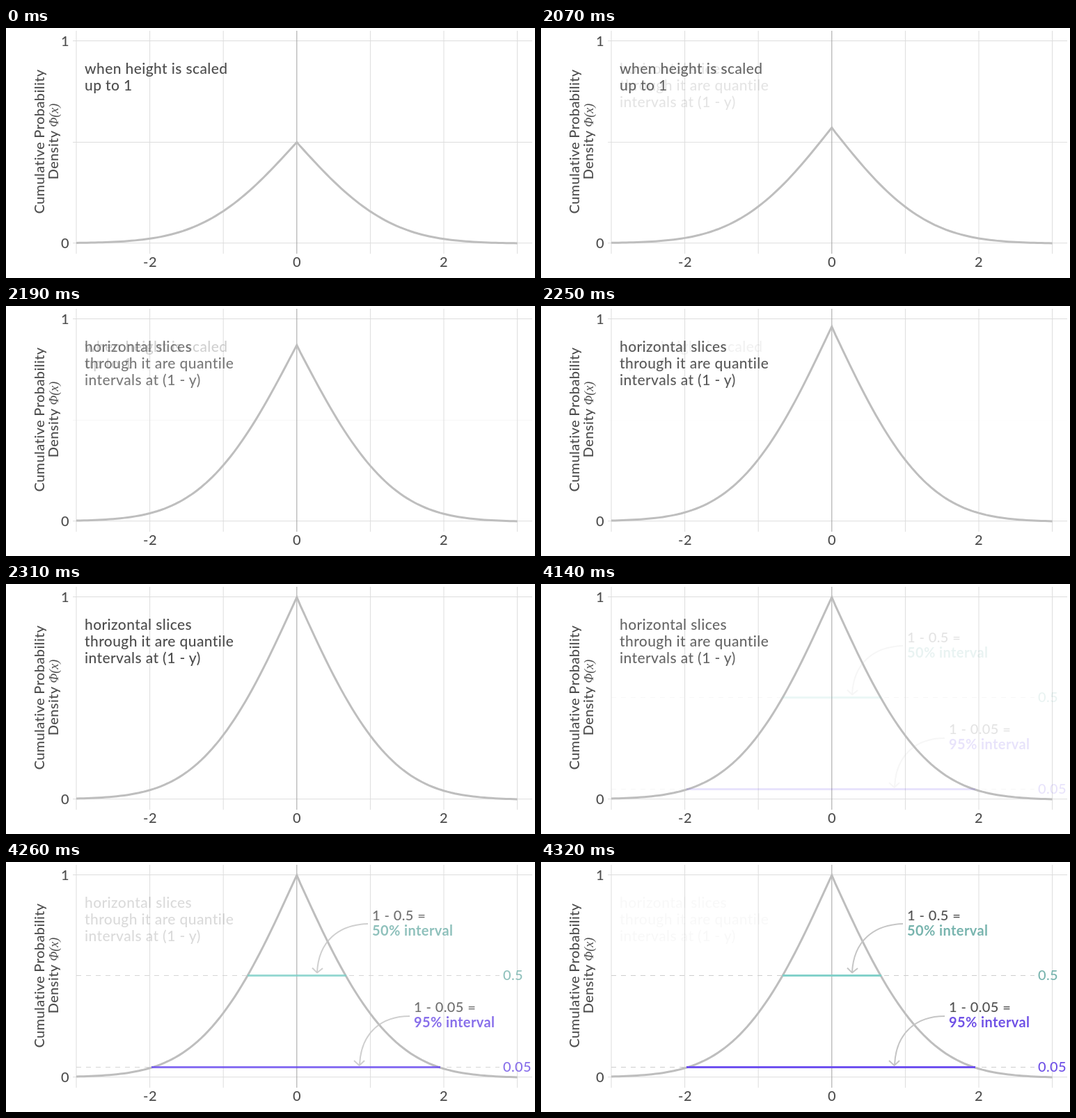
These frames come from a looping animation (760 px wide and 360 px high, 9050 ms). An HTML page:

```html
<!DOCTYPE html>
<html lang="en">
<head>
<meta charset="utf-8">
<title>Quantile intervals</title>
<style>
  html, body { margin: 0; width: 100%; height: 100%; overflow: hidden; background: #fff; }
  svg { display: block; width: 760px; height: 360px; }
  text { font: 500 20px Lato, "Open Sans", sans-serif; letter-spacing: .4px; fill: #4d4d4d; }
  .head text { font-size: 21px; letter-spacing: .4px; }
  .mid { text-anchor: middle; }
  .bold { font-weight: 700; }
  .math { font: italic 18px "Liberation Serif", serif; letter-spacing: 0; }
  path { fill: none; }
  .grid { stroke: #ddd; }
  .axis { stroke: #a2a2a2; }
  .curve { stroke: #bebebe; stroke-width: 3; }
  .dash { stroke: #ccc; stroke-dasharray: 7 7; }
  .arrow { stroke: #c4c4c4; stroke-width: 2; }
  .bar { stroke-width: 3; }
</style>
</head>
<body>
<svg viewBox="0 0 760 360">
  <path class="grid" id="grid"/>
  <path class="grid" id="half" d="M96 164.5H756"/>
  <path class="axis" d="M417.8 4V325"/>
  <path class="curve" id="curve"/>

  <g class="mid">
    <text x="85" y="25.5">1</text>
    <text x="85" y="316.5">0</text>
    <text x="207" y="344">-2</text>
    <text x="418" y="344">0</text>
    <text x="629" y="344">2</text>
    <text transform="translate(55 163.5) rotate(-90)">Cumulative Probability</text>
    <text transform="translate(75 163.5) rotate(-90)">Density <tspan class="math">Φ(x)</tspan></text>
  </g>

  <g class="head" id="scaled">
    <text x="113" y="66">when height is scaled</text>
    <text x="113" y="90">up to 1</text>
  </g>
  <g class="head" id="slices">
    <text x="113" y="66">horizontal slices</text>
    <text x="113" y="90">through it are quantile</text>
    <text x="113" y="114">intervals at (1 - y)</text>
  </g>

  <g id="intervals">
    <path class="dash" d="M101 163.5H709M101 295.5H709"/>
    <path class="bar" stroke="#7fd0c9" d="M347 163.5H489"/>
    <path class="bar" stroke="#6b4df0" d="M209 295.5H624"/>
    <path class="arrow" d="M520 89C478 90 449 114 447 159M440 152.500L447 159.500L455 153"/>
    <path class="arrow" d="M580 222C540 222 510 245 508 292M500 286L507.500 293L515 286"/>
    <text x="526" y="84">1 - 0.5 =</text>
    <text x="526" y="106" class="bold" style="fill:#74b2ac">50% interval</text>
    <text x="714" y="170" style="fill:#74b2ac">0.5</text>
    <text x="586" y="216">1 - 0.05 =</text>
    <text x="586" y="238" class="bold" style="fill:#6b4ce6">95% interval</text>
    <text x="714" y="302" style="fill:#6b4ce6">0.05</text>
  </g>
</svg>
<script>
const LOOP = 9050, STEP = 30, LAST_CHANGE = 4320;
const el = id => document.getElementById(id);
const px = u => 417.8 + 105.6 * u;
const fade = (id, value) => el(id).setAttribute('opacity', value);

// Normal tail probability beyond |u|
function tail(u) {
  const x = Math.abs(u);
  return 0.5 * (1 + x * (0.196854 + x * (0.115194 + x * (0.000344 + x * 0.019527)))) ** -4;
}

// The right half falls to exactly zero at the edge of the plot
const density = u => u > 0 ? tail(u) - tail(3) : tail(u);

function curvePath(height) {
  let d = '';
  for (let i = -60; i <= 60; i++) {
    const u = i / 20;
    d += `${i > -60 ? 'L' : 'M'}${px(u).toFixed(2)} ${(309.9 - 291 * height * density(u)).toFixed(2)}`;
  }
  return d;
}

function easeOut(time, start, duration) {
  const t = Math.min(1, Math.max(0, (time - start) / duration));
  return Math.sin(t * Math.PI / 2);
}

let grid = 'M96 18.5H756M96 309.7H756';
for (const u of [-3, -2, -1, 1, 2, 3]) grid += `M${px(u)} 4V325`;
el('grid').setAttribute('d', grid);

function draw(now) {
  const time = Math.min(LAST_CHANGE, Math.floor(now % LOOP / STEP) * STEP);
  const grow = easeOut(time, 2045, 272);
  const reveal = easeOut(time, 4117, 243);
  el('curve').setAttribute('d', curvePath(1 + grow));
  fade('half', 1 - grow);
  fade('scaled', 1 - grow);
  fade('slices', grow * (1 - reveal));
  fade('intervals', reveal);
}

const begin = performance.now();
function tick() {
  draw(performance.now() - begin);
  requestAnimationFrame(tick);
}
tick();
</script>
</body>
</html>
```
